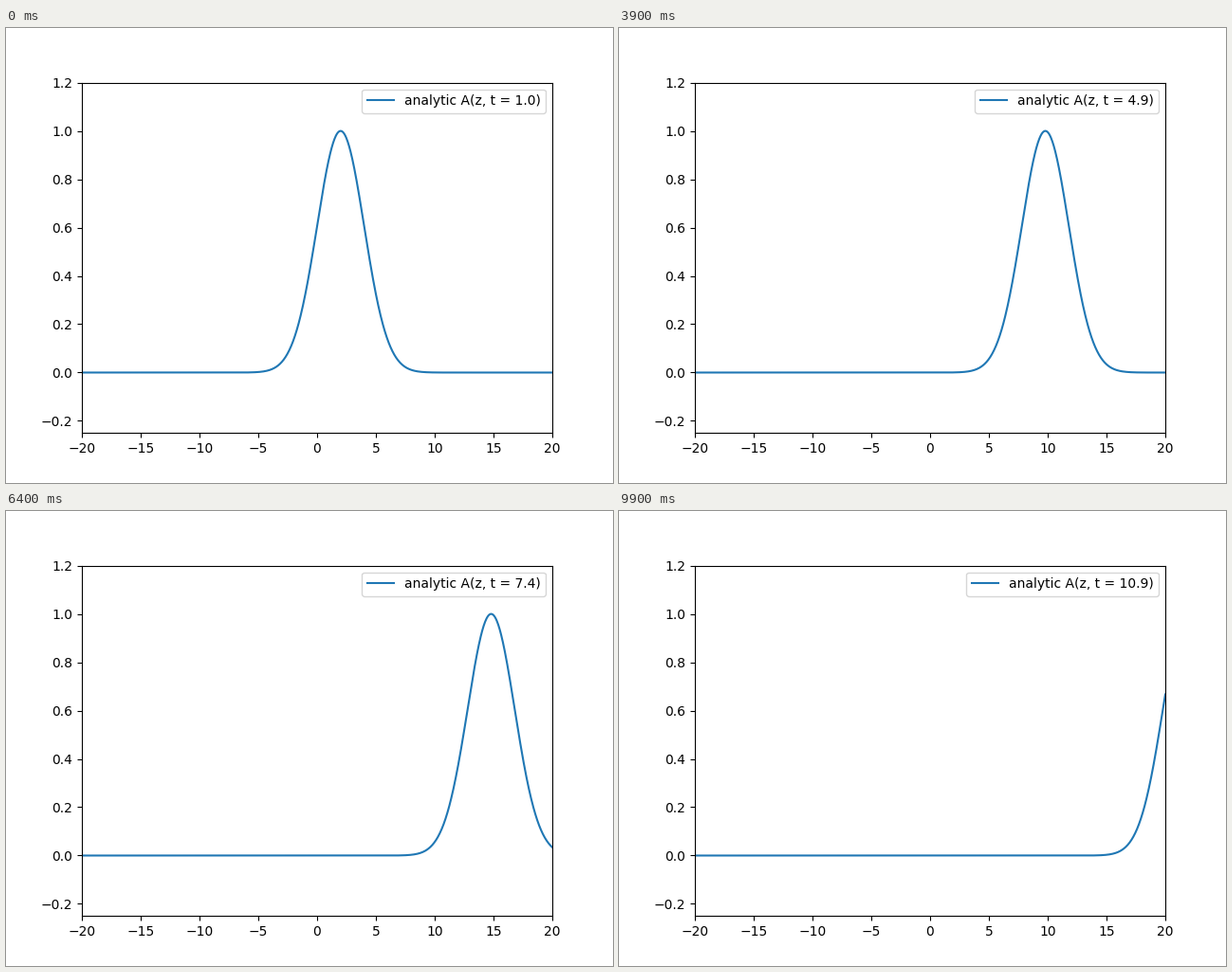
A matplotlib script for the animation above (10000 ms loop, 640x480 px).

```python
import numpy as np
import matplotlib.pyplot as plt
from matplotlib.animation import FuncAnimation

FRAMES = 100
INTERVAL = 100  # ms
SPEED = 2.0
WIDTH = 2.0

z = np.linspace(-20, 20, 1001)


def pulse(z, t):
    return np.exp(-(z - SPEED * t) ** 2 / (2 * WIDTH ** 2))


def label(t):
    return f"analytic A(z, t = {t:.1f})"


fig, ax = plt.subplots(figsize=(6.4, 4.8), dpi=100)
ax.set_xlim(-20, 20)
ax.set_ylim(-0.25, 1.2)
line, = ax.plot(z, pulse(z, 1.0), label=label(1.0))
legend = ax.legend(loc="upper right")
caption = legend.get_texts()[0]


def update(i):
    t = 1 + i / 10
    line.set_ydata(pulse(z, t))
    caption.set_text(label(t))
    return line, legend


anim = FuncAnimation(fig, update, frames=FRAMES, interval=INTERVAL,
                     repeat=True, repeat_delay=0, blit=False)
plt.show()
```
